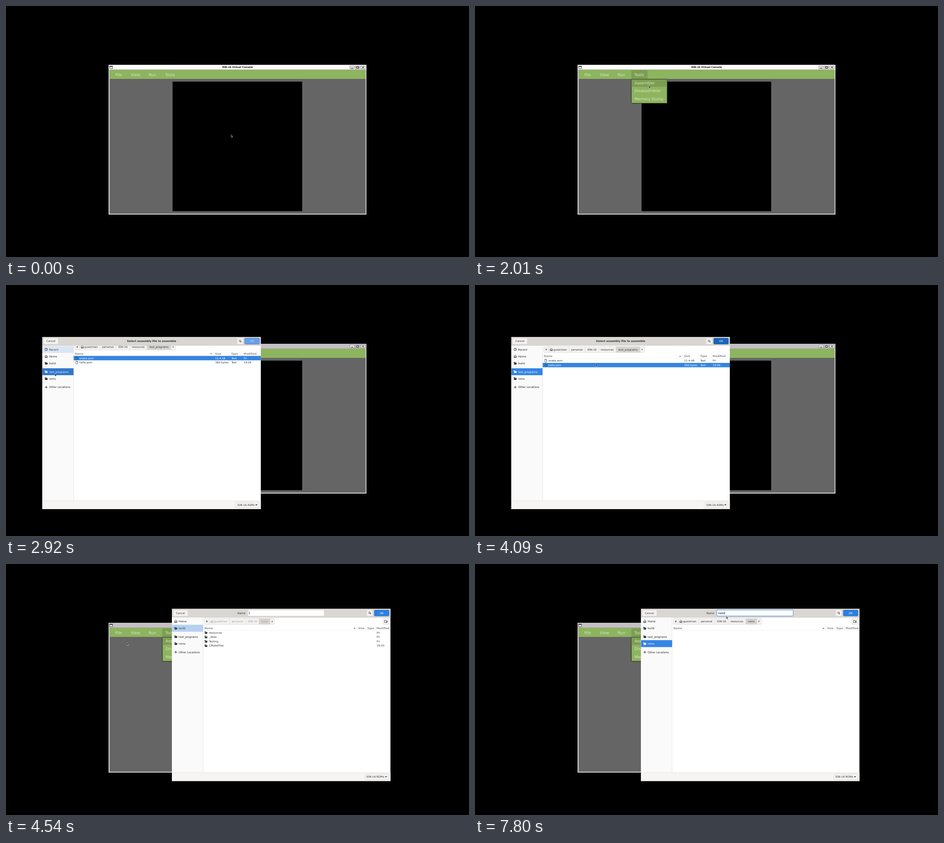
Recreate the animation shown at these times as an HTML page. Size 1016 by 551 pixels, loop 8000 ms.

```html
<!DOCTYPE html>
<html lang="en">
<head>
<meta charset="utf-8">
<title>Virtual Console</title>
<style>
html, body { margin: 0; width: 100%; height: 100%; overflow: hidden; background: #000; }
svg { display: block; width: 100%; height: 100%; }
text { font: 5.87px "DejaVu Sans", sans-serif; text-rendering: geometricPrecision; white-space: pre; }
.bold { font-weight: bold; }
.title { font-weight: bold; font-size: 5.3px; }
.menu { font-size: 8.6px; }
.mid { text-anchor: middle; }
</style>
</head>
<body>
<svg viewBox="0 0 1016 551"></svg>
<script>
const LOOP = 8000, STEP = 90;
const INK = '#2e3436', BLUE = '#3584e4', GREEN = '#8db45f', HOVER = '#7c9e53', LINE = '#cdc7c2';
const svg = document.querySelector('svg');

// Pointer moves: start, number of steps, end position
const START = [494, 282.3];
const MOVES = [
  [370, 7, 362, 153.5], [1190, 7, 382, 175], [2100, 6, 107.3, 194.6],
  [3010, 8, 265.3, 171.8], [3730, 1, 265.3, 173], [4630, 8, 403.7, 171],
  [5350, 1, 408, 171.3], [5530, 1, 412, 178.5], [5620, 6, 551.6, 111], [6250, 1, 551.6, 115]
];
const KEYS = [6900, 7170, 7440, 7620, 7800];
const CARET = [0, 3.7, 7.3, 8.9, 10.6, 14.2];

const rect = (x, y, w, h, fill, more = '') =>
  `<rect x="${x}" y="${y}" width="${w}" height="${h}" fill="${fill}" ${more}/>`;
const path = (d, fill, more = '') => `<path d="${d}" fill="${fill}" ${more}/>`;
const at = (x, y, body) => `<g transform="translate(${x} ${y})">${body}</g>`;
// y is the middle of the text line
const text = (x, y, s, fill = INK, cls = '') =>
  `<text x="${x}" y="${y + 2.1}" fill="${fill}" class="${cls}">${s}</text>`;
const stroke = (c, w = .8) => `stroke="${c}" stroke-width="${w}"`;
const button = (x, y, w, h, fill = '#f4f2f1', edge = LINE) =>
  rect(x, y, w, h, fill, `rx="2" ${stroke(edge, .5)}`);

// Small icons, centred on 0,0
const icons = {
  clock: c => `<circle r="2.8" fill="none" ${stroke(c, .9)}/>` + path('M0 -1.7V0H1.3', 'none', stroke(c, .7)),
  home: c => path('M-3.3 .3L0 -2.8L3.3 .3M-2.3 0V2.7H-.7V.8H.7V2.7H2.3V0', 'none', stroke(c, .9)),
  folder: c => path('M-3 -2.6H-.4L.2 -1.8H2.6V-1H-1.8L-3 1.5Z', c) + path('M-1.5 -.5H3.4L2.5 2.7H-2.9Z', c),
  plus: c => path('M-3 0H3M0 -3V3', 'none', stroke(c, .9)),
  page: c => path('M-2.2 -3H.6L2.2 -1.4V3H-2.2ZM.4 -3V-1.2H2.2', 'none', stroke(c, .7)),
  search: c => `<circle cx="-.5" cy="-.5" r="1.8" fill="none" ${stroke(c, .9)}/>` + path('M.8 .8L2.6 2.6', 'none', stroke(c, 1.1)),
  newFolder: c => path('M-3 -2.3H-.5L.2 -1.4H3V2.4H-3Z', 'none', stroke(c, .8)) + path('M.2 .5H2.4M1.3 -.6V1.6', 'none', stroke(c, .7)),
  left: c => path('M1.2 -2.2V2.2L-1.4 0Z', c),
  right: c => path('M-1.2 -2.2V2.2L1.4 0Z', c),
  up: c => path('M-2.3 1.2H2.3L0 -1.2Z', c),
  down: c => path('M-2.4 -1.2H2.4L0 1.4Z', c)
};
const icon = (name, x, y, c = INK) => at(x, y, icons[name](c));

function pointer(t) {
  let [x, y] = START;
  for (const [start, steps, ex, ey] of MOVES) {
    if (t < start) break;
    const p = Math.min(1, (Math.floor((t - start) / STEP) + 1) / steps);
    const e = p * p * (3 - 2 * p);
    x += (ex - x) * e;
    y += (ey - y) * e;
  }
  return [x, y];
}

function consoleWindow(t) {
  const focus = t < 2100 || (t >= 4360 && t < 4540);
  let s = rect(225, 129, 566, 329, '#c9c7c9') +
    rect(225.5, 129.4, 565, 10.4, focus ? '#fffaff' : '#c6bec6') +
    rect(227.5, 139.8, 561.5, 316, '#656565') + rect(227.5, 139.8, 561.5, 20.2, GREEN) +
    rect(365.5, 166, 284.5, 284.5, '#000');
  s += rect(227.6, 132, 6.2, 5.3, '#fff', stroke('#222')) + rect(227.6, 132, 6.2, 1.6, '#222');
  s += text(508, 134.2, 'IDN-16 Virtual Console', '#111', 'title mid');
  for (const x of [754.4, 766.4, 778.4]) s += rect(x, 131.4, 10.2, 6.7, '#dedede', stroke('#777', .6));
  s += path('M757.5 136.5H761.5M769 133.2H774M769 133.2V136.6H774V133.2M781.8 133L785.2 136.6M785.2 133L781.8 136.6', 'none', stroke('#111', 1));
  const item = (x, y, label) => text(x, y + 1, label, '#dfe3c5', 'menu');
  if (t >= 820) s += rect(343, 141.3, 35.8, 18, HOVER, 'rx="2"');
  s += item(240, 150.5, 'File') + item(274, 150.5, 'View') + item(313, 150.5, 'Run') + item(349.5, 150.5, 'Tools');
  if (t >= 1190) {
    s += rect(343, 160.7, 78.8, 53, GREEN, `rx="1.5" ${stroke('#1b2211', 1)}`);
    if (t >= 1550) s += rect(343.6, 161.2, 77.7, 16.2, HOVER);
    s += item(350, 168.4, 'Assembler') + item(350, 186, 'Disassembler') + item(350, 203.5, 'Memory Dump');
  }
  return s;
}

// Side list rows: label, icon, middle y
const PLACES = [
  ['Recent', 'clock', 141.4], ['Home', 'home', 156.6], ['build', 'folder', 171.8],
  ['test_programs', 'folder', 190.4], ['roms', 'folder', 205.6], ['Other Locations', 'plus', 224.3]
];

// look maps a label to its [background, text colour]
function places(rows, rise, look, hoverY) {
  return rows.map(([label, kind, mid]) => {
    const y = mid - rise;
    const hover = Math.abs(hoverY - y) < 7.6 && ['#ebebeb', INK];
    const [fill, ink] = look[label] || hover || ['none', '#1d2123'];
    return rect(80, y - 7.6, 68.2, 15.2, fill) + icon(kind, 88.2, y, ink) + text(94.7, y, label, ink);
  }).join('');
}

// crumbs: [label, text x]; end is the right edge of the last one
function crumbBar(crumbs, end, ink) {
  const edges = [...crumbs.map(c => c[1] - 5), end];
  edges[0] = 161;
  let s = button(151, 135, end + 10 - 151, 13.3) + rect(edges[crumbs.length - 1], 135.2, end - edges[crumbs.length - 1], 12.9, '#d8d4d0');
  edges.forEach(x => s += rect(x, 135, .5, 13.3, LINE));
  crumbs.forEach(([label, x]) => s += text(x, 141.6, label, ink));
  return s + icon('left', 156, 141.6) + icon('home', 167.4, 141.6, ink) + icon('right', end + 5, 141.6, '#70757a');
}
const HOME_CRUMBS = [['guestman', 172], ['personal', 211], ['IDN-16', 246.5]];

function header(cols, arrow) {
  let s = text(151, 156.3, 'Name', '#8b8e8f', 'bold') + icon('up', arrow, 156.3, '#777');
  ['Size', 'Type', 'Modified'].forEach((h, i) =>
    s += text(cols[i], 156.3, h, '#8b8e8f', 'bold') + rect(cols[i] - 2.7, 151, .5, 10, '#dedbd8'));
  return s + rect(148.5, 160.8, 410.5, .4, '#e3e0dd');
}

function frame(okFill, okInk, filter, filterX) {
  const edge = okInk === '#a3a6a6' ? LINE : '#1b69b6';
  return rect(79.7, 114, 479.5, 378, '#fff') + rect(79.7, 114, 479.5, 18.8, '#dad6d2') +
    rect(79.7, 132.5, 479.5, .5, '#bfb8b1') + rect(79.7, 133, 68.5, 340.5, '#fafafa') +
    rect(148, 133, .5, 340.5, '#d5d0cc') + rect(79.7, 473.5, 479.5, 18.5, '#f6f5f4') +
    rect(79.7, 473.3, 479.5, .5, '#d5d0cc') +
    button(82.2, 116.5, 32.6, 13.4) + text(98.5, 123.2, 'Cancel', INK, 'mid') +
    button(507, 116.5, 13.5, 13.4) + icon('search', 513.9, 123.2) +
    button(523.7, 116.5, 32.6, 13.4, okFill, edge) + text(540, 123.2, 'OK', okInk, 'mid') +
    button(503, 476.2, 53.2, 13.3) + text(filterX, 482.8, filter) + icon('down', 549.4, 482.8);
}

const DISABLED = ['#e2dfdc', '#a3a6a6'], READY = ['#2c80df', '#fff'], FADING = ['#689fe8', '#cfe1f8'];
const SELECTED = [BLUE, '#fff'], PRESSED = ['#3277cb', '#e8f1fc'];

function openDialog(t, pointerY) {
  const chosen = t >= 2920, first = chosen && t < 3010;
  const ok = !chosen ? DISABLED : first ? FADING : t >= 4090 ? ['#1b63b8', '#fff'] : READY;
  const look = !chosen ? { Recent: SELECTED }
    : first ? { Recent: ['#dbe6f4', INK], test_programs: PRESSED } : { test_programs: SELECTED };
  const lift = !chosen ? 18 : first ? 5.7 : t < 3100 ? 1 : 0;
  let list = header([458.7, 494, 521.3], 450);
  if (chosen) {
    list += crumbBar([...HOME_CRUMBS, ['resources', 276], ['test_programs', 314.5]], 362, INK);
    const files = [['snake.asm', '11.4 kB', 'Fri'], ['hello.asm', '360 bytes', '19:26']];
    files.forEach(([name, size, date], i) => {
      const y = 166.2 + i * 9.6, on = i === (t >= 3910 ? 1 : 0), ink = on ? '#fff' : INK;
      if (on) list += rect(148.5, y - 4.8, 410.5, 9.6, BLUE);
      list += icon('page', 155.3, y, on ? '#173d68' : INK) + text(161, y, name, ink) +
        text(459, y, size, ink) + text(494.5, y, 'Text', ink) + text(521.7, y, date, ink);
    });
  }
  return frame(...ok, 'IDN-16 ASMs', 508) +
    text(319.5, 123.2, 'Select assembly file to assemble', INK, 'bold mid') +
    places(PLACES, 0, look, t >= 2460 && t < 3370 ? pointerY : 0) +
    `<clipPath id="list"><rect x="148" y="133" width="411" height="340"/></clipPath>` +
    `<g clip-path="url(#list)">${at(0, -lift, list)}</g>`;
}

function saveDialog(t, pointerY) {
  const fresh = t < 4630, chosen = t >= 5530, first = chosen && t < 5620;
  const ok = !chosen || t >= 7260 ? READY : t >= 7170 ? FADING : DISABLED;
  const look = fresh ? { build: ['#b5d0f1', INK] } : !chosen ? { build: SELECTED }
    : first ? { build: ['#9fc1ee', '#7698c2'], roms: PRESSED } : { roms: SELECTED };
  const typed = KEYS.filter(k => t >= k).length;
  const caret = t < 5350 || (t >= 5620 && t < 6530) || t >= 6900;
  const crumbs = chosen ? [['resources', 275.8], ['roms', 314.6]] : [['build', 275.8]];
  let s = frame(...ok, 'IDN-16 ROMs', 506.6) + text(223.6, 123.2, 'Name') +
    rect(246.1, 116.5, 167.7, 13.3, '#fff', `rx="1.8" ${fresh ? stroke(LINE, .6) : stroke(BLUE, 1)}`) +
    text(249.1, 123.2, 'hello'.slice(0, typed), '#000');
  if (caret) s += rect(249.1 + CARET[typed], 119.9, .6, 6.6, '#000');
  s += places(PLACES.slice(1), 15.2, look, t >= 5080 && t < 5710 ? pointerY + 15.6 : 0) +
    crumbBar([...HOME_CRUMBS, ...crumbs], chosen ? 334 : 295, fresh ? '#a0a3a3' : INK) +
    button(542.6, 135, 13.4, 13.3) + icon('newFolder', 549.3, 141.7) +
    header([488.6, 508, 528.6], 480.5);
  if (!chosen) [['resources', 'Fri'], ['_deps', 'Fri'], ['Testing', 'Fri'], ['CMakeFiles', '19:33']].forEach(([name, date], i) => {
    const y = 166.2 + i * 9.6;
    s += icon('folder', 154.4, y) + text(161, y, name) + text(528.9, y, date);
  });
  return at(284.4, -15.6, s);
}

function scene(t) {
  const [x, y] = pointer(t);
  let s = consoleWindow(t);
  if (t >= 2100 && t < 4270) s += openDialog(t, y);
  if (t >= 4540) s += saveDialog(t, y);
  return s + at(x, y, path('M0 0V5.6L1.3 4.5L2.1 6.3L3 5.9L2.2 4.1H3.8Z', '#000', stroke('#fff', .5)));
}

let shown;
function tick() {
  const next = scene(performance.now() % LOOP);
  if (next !== shown) svg.innerHTML = shown = next;
  requestAnimationFrame(tick);
}
tick();
</script>
</body>
</html>
```
